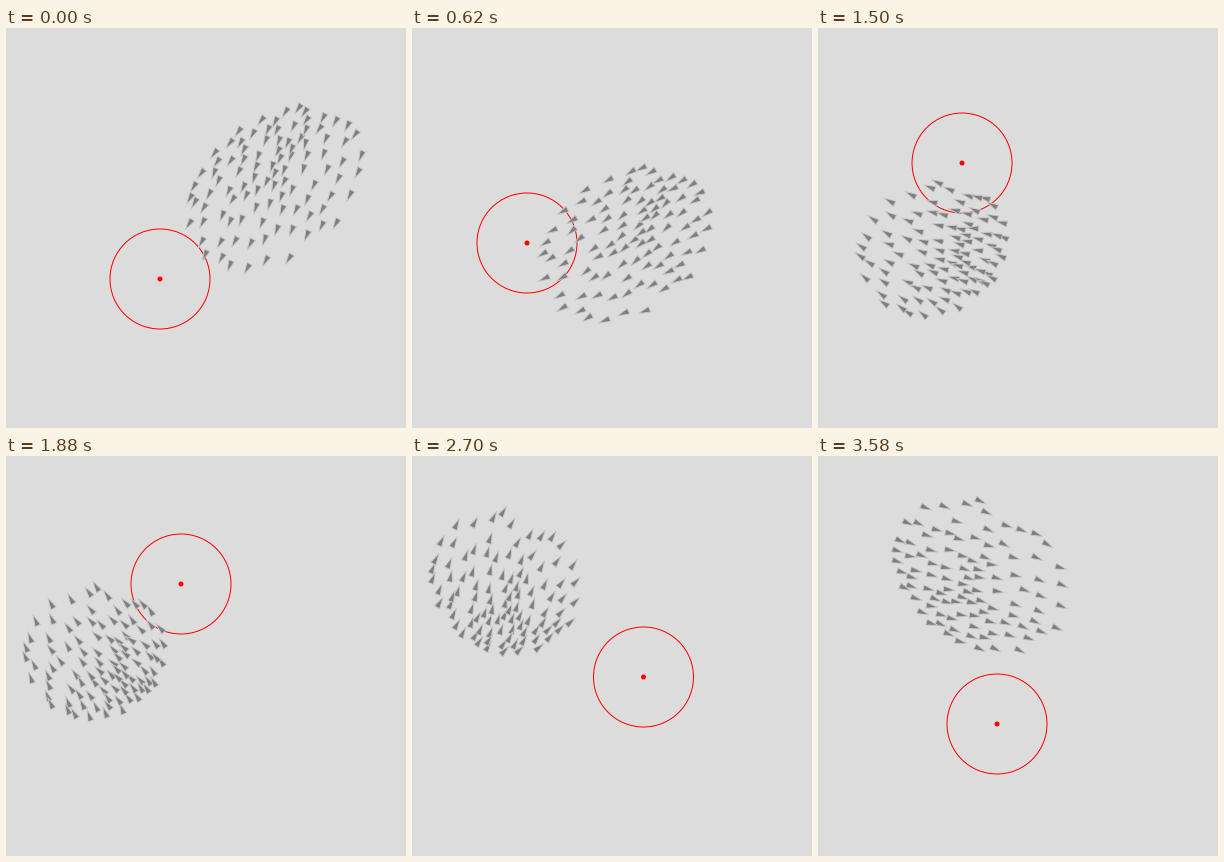
These frames come from a looping animation (400x400 px, 3600 ms). A matplotlib script:

```python
import numpy as np
import matplotlib.pyplot as plt
from matplotlib.animation import FuncAnimation
from matplotlib.collections import PolyCollection
from matplotlib.patches import Circle

SIZE, DPI = 400, 100
FRAMES, INTERVAL = 180, 20
PX = 72 / DPI
BIRDS = 100
CORE_SHIFT = 22  # how far the dense core sits off the middle, in px

# Key points of the two paths: frame, x, y
TARGET = [(0, 154, 251), (9, 143, 252.5), (31, 115, 215), (57, 128, 162),
          (81, 152, 130), (94, 175, 128), (108, 213, 157), (119, 227, 192),
          (135, 231.5, 221), (150, 219, 243), (163, 211.5, 257.5), (179, 179, 268)]
FLOCK = [(0, 270, 160), (31, 214, 216), (57, 151, 231), (94, 89, 195),
         (119, 84, 149), (150, 112, 111), (179, 165, 119)]

rng = np.random.default_rng(11)


def smooth_path(points):
    """Cubic Hermite curve through the points, sampled at every frame."""
    points = np.array(points, float)
    keys, xy = points[:, 0], points[:, 1:]
    slopes = np.gradient(xy, keys, axis=0, edge_order=2)
    t = np.arange(FRAMES)
    i = np.clip(np.searchsorted(keys, t, side="right") - 1, 0, len(keys) - 2)
    span = (keys[i + 1] - keys[i])[:, None]
    u = (t - keys[i])[:, None] / span
    return ((2 * u**3 - 3 * u**2 + 1) * xy[i]
            + (u**3 - 2 * u**2 + u) * span * slopes[i]
            + (3 * u**2 - 2 * u**3) * xy[i + 1]
            + (u**3 - u**2) * span * slopes[i + 1])


def disc_points(count):
    """Evenly scattered points in the unit disc, drawn towards the middle."""
    points = np.zeros((1, 2))
    while len(points) < count:
        angle = rng.uniform(0, 2 * np.pi, 30)
        radius = np.sqrt(rng.uniform(0, 1, 30))
        tries = np.column_stack([radius * np.cos(angle), radius * np.sin(angle)])
        gaps = np.linalg.norm(tries[:, None] - points, axis=2).min(axis=1)
        points = np.vstack([points, tries[gaps.argmax()]])
    return points * np.linalg.norm(points, axis=1, keepdims=True) ** 0.25


def flock_paths():
    """The flock is a disc that stretches and shears while its core circles."""
    s = np.linspace(0, 1, FRAMES)
    across = np.column_stack([78 + 10 * np.cos(1.7 * np.pi * s), -23 + 24 * s**2])
    down = np.column_stack([-5 + 25 * np.sin(np.pi * s / 2),
                            70 + 7 * np.cos(2 * np.pi * s)])
    turn = np.radians(-100 + 255 * s)
    core = CORE_SHIFT * np.column_stack([np.cos(turn), np.sin(turn)])

    p = disc_points(BIRDS)
    inner = 1 - (p**2).sum(axis=1)
    return (smooth_path(FLOCK)[:, None]
            + p[:, :1] * across[:, None]
            + p[:, 1:] * down[:, None]
            + inner[:, None] * core[:, None])


target = smooth_path(TARGET)
flock = flock_paths()
velocity = np.gradient(flock, axis=0)
heading = (np.arctan2(velocity[..., 1], velocity[..., 0])
           + rng.normal(0, 0.07, BIRDS))


def triangles(frame):
    angle = heading[frame]
    forward = np.column_stack([np.cos(angle), np.sin(angle)])
    side = 3 * np.column_stack([-np.sin(angle), np.cos(angle)])
    tail = flock[frame] - 5 * forward
    return np.stack([tail + 12 * forward, tail + side, tail - side], axis=1)


fig = plt.figure(figsize=(SIZE / DPI, SIZE / DPI), dpi=DPI, facecolor="#dcdcdc")
ax = fig.add_axes([0, 0, 1, 1])
ax.set_xlim(0, SIZE)
ax.set_ylim(SIZE, 0)
ax.axis("off")

ring = ax.add_patch(Circle(target[0], 50, fill=False, ec="red", lw=PX, zorder=1))
dot = ax.add_patch(Circle(target[0], 2.5, fc="red", ec="none", zorder=1))
birds = PolyCollection(triangles(0), facecolors="#7f7f7f", edgecolors="#c8c8c8",
                       linewidths=0.9 * PX, joinstyle="miter", zorder=2)
ax.add_collection(birds, autolim=False)


def draw(frame):
    ring.center = dot.center = tuple(target[frame])
    birds.set_verts(triangles(frame))
    return ring, dot, birds


anim = FuncAnimation(fig, draw, frames=FRAMES, interval=INTERVAL,
                     repeat=True, repeat_delay=0, blit=False)
plt.show()
```
